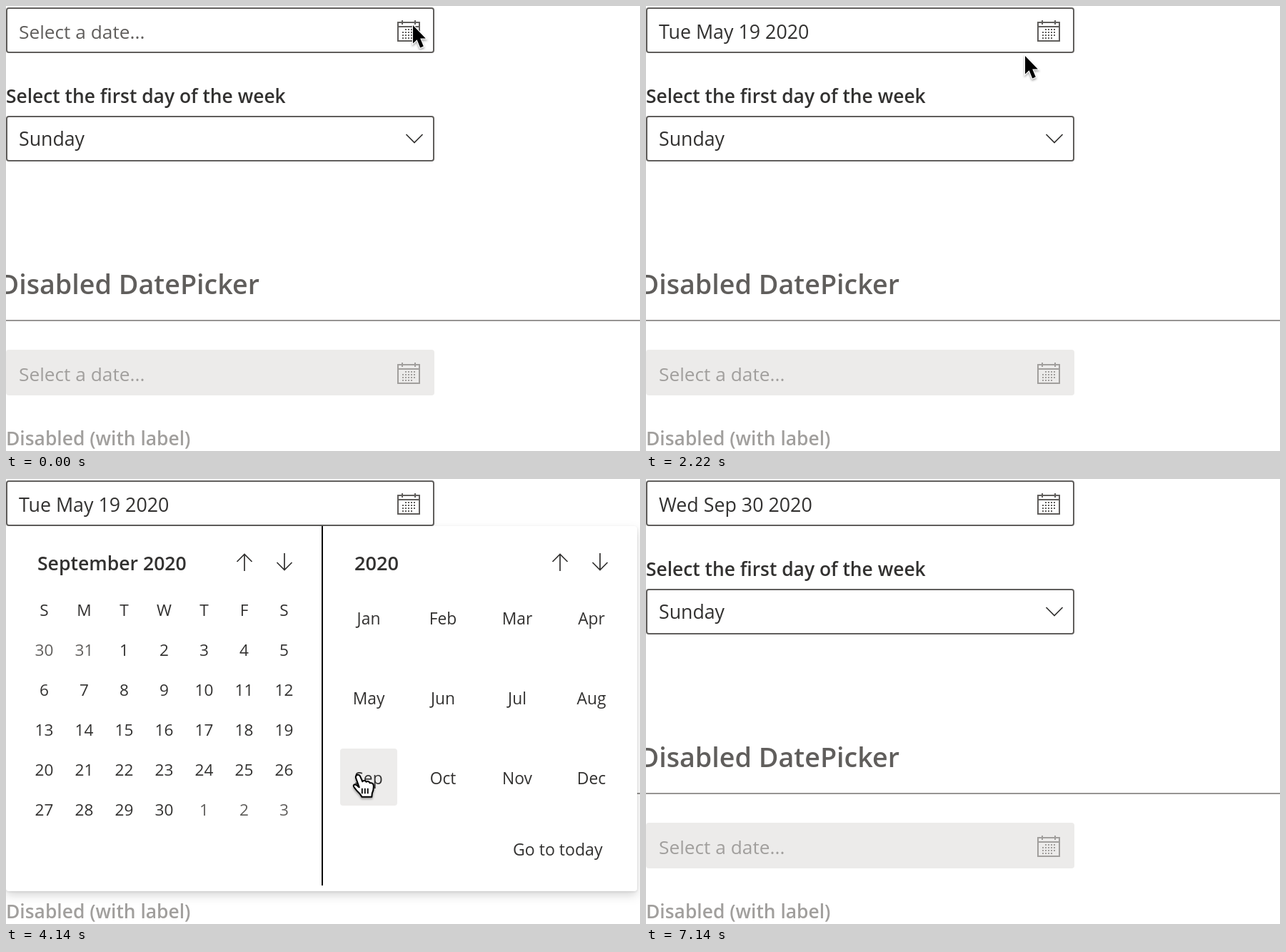
Recreate the animation shown at these times as an HTML page. Size 888 by 624 pixels, loop 7.2 s.

```html
<!DOCTYPE html>
<html lang="en">
<head>
<meta charset="utf-8">
<title>Date picker</title>
<style>
  html, body { margin: 0; width: 100%; height: 100%; overflow: hidden; background: #fff; }
  svg { display: block; width: 100%; height: 100%; }
  text { font-family: "Open Sans", "Noto Sans", sans-serif; fill: #323130; white-space: pre; }
  .semi { font-weight: 600; }
  .mid { text-anchor: middle; }
  .muted { fill: #605e5c; }
  .off { fill: #a19f9d; }
  .line { fill: none; stroke: #323130; stroke-width: 1.7; }
  .box { fill: #fff; stroke: #605e5c; stroke-width: 2; }
  .sheet { fill: #fff; filter: drop-shadow(0 6px 7px rgba(0,0,0,.14)) drop-shadow(0 1px 1.8px rgba(0,0,0,.11)); }
  .cursor { filter: drop-shadow(0 2px 1.5px rgba(0,0,0,.35)); }
</style>
</head>
<body>
<svg id="stage" viewBox="0 0 888 624"></svg>
<script>
const LOOP = 7200, STEP = 60;
const PICK_DAY = 1740, PICK_MONTH = 3360, PICK_LAST = 5940;
const OPEN = [[900, PICK_DAY], [2460, PICK_LAST]];

// Pointer stops: time, x, y
const STOPS = [
  [0, 570, 27], [960, 570, 27], [1320, 269, 337], [1560, 160, 400], [1800, 160, 402],
  [2220, 531, 70], [2340, 568, 32], [2580, 568, 32], [3240, 512, 397], [3480, 500, 415],
  [3960, 500, 415], [4500, 476, 422], [5040, 475, 422], [5700, 211, 457], [6120, 211, 457],
  [7080, 232, 645], [LOOP, 232, 645]
];

const svg = document.getElementById('stage');

function el(tag, attrs = {}, parent = svg) {
  const node = document.createElementNS('http://www.w3.org/2000/svg', tag);
  for (const key in attrs) node.setAttribute(key, attrs[key]);
  parent.appendChild(node);
  return node;
}
function text(str, x, y, size, cls = '', parent = svg) {
  const node = el('text', { x, y, 'font-size': size, class: cls }, parent);
  node.textContent = str;
  return node;
}
function rect(x, y, width, height, attrs, parent = svg) {
  return el('rect', { x, y, width, height, ...attrs }, parent);
}
const show = (node, on) => { node.style.display = on ? '' : 'none'; };

function calendarIcon(y, color) {
  const g = el('g', { transform: `translate(548 ${y})`, stroke: color, 'stroke-width': 2, fill: 'none' });
  el('path', { d: 'M1 3H31V29H1ZM1 9H31M7 0V6M25 0V6' }, g);
  for (let r = 0; r < 4; r++)
    for (let c = 0; c < 5; c++)
      if (!(r === 0 && c === 0) && !(r === 3 && c === 4))
        rect(7 + c * 4, 12 + r * 4, 2, 2, { fill: color, stroke: 'none' }, g);
}
function arrow(x, dir, parent) {
  el('path', { class: 'line', transform: `translate(${x} ${116.5 + dir / 2}) scale(1 ${dir})`,
    d: 'M0 12V-11.5M-10.5 -1L0 -11.5L10.5 -1' }, parent);
}

// Page below the callout
rect(1, 3, 598, 62, { rx: 3, class: 'box' });
const hint = text('Select a date...', 18, 46, 26.3, 'muted');
const value = text('', 18, 46, 26.8);
calendarIcon(20, '#605e5c');
text('Select the first day of the week', 0, 136, 26.4, 'semi');
rect(1, 155, 598, 62, { rx: 3, class: 'box' });
text('Sunday', 18, 196, 26.7);
el('path', { class: 'line', d: 'M560.5 180L572 191.5L583.5 180' });
text('Disabled DatePicker', 355, 404, 37.7, 'semi muted').setAttribute('text-anchor', 'end');
rect(0, 440, 888, 2, { fill: '#979593' });
rect(0, 482, 600, 64, { rx: 4, fill: '#ecebea' });
text('Select a date...', 18, 526, 26.3, 'off');
calendarIcon(500, '#a19f9d');
text('Disabled (with label)', 0, 616, 26.4, 'semi off');

// Callout
const panel = el('g');
rect(0, 66, 884, 512, { rx: 4, class: 'sheet' }, panel);
rect(442, 66, 2, 504, { fill: '#000' }, panel);
const chosen = rect(0, 378, 56, 56, { rx: 2, fill: '#e1e0df' }, panel);
const hover = rect(0, 0, 56, 56, { rx: 4, fill: '#edeceb' }, panel);
const title = text('', 44, 128, 26.6, 'semi', panel);
text('2020', 488, 128, 27.2, 'semi', panel);
[[334, 1], [390, -1], [776, 1], [832, -1]].forEach(([x, dir]) => arrow(x, dir, panel));
[...'SMTWTFS'].forEach((d, i) => text(d, 53.5 + 56 * i, 192, 22.6, 'mid', panel));
'Jan Feb Mar Apr May Jun Jul Aug Sep Oct Nov Dec'.split(' ').forEach((m, i) =>
  text(m, 508 + 104 * (i % 4), 204 + 112 * Math.floor(i / 4), 22.8, 'mid', panel));
const today = text('Go to today', 710, 528, 23.1, '', panel);

function monthGrid(lead, lastLen, len, rows, now) {
  const g = el('g', {}, panel);
  for (let i = 0; i < rows * 7; i++) {
    const n = i - lead + 1, inside = n > 0 && n <= len;
    const day = n < 1 ? n + lastLen : n > len ? n - len : n;
    const x = 53.5 + 56 * (i % 7), y = 248 + 56 * Math.floor(i / 7);
    const isNow = inside && day === now;
    if (isNow) el('circle', { cx: 278, cy: y - 10, r: 24, fill: '#0078d4' }, g);
    const label = text(day, x, y, 22.6, 'mid' + (inside ? '' : ' muted') + (isNow ? ' semi' : ''), g);
    if (isNow) label.style.fill = '#fff';
  }
  return g;
}
const may = monthGrid(5, 30, 31, 6, 21);
const sep = monthGrid(2, 31, 30, 5, 0);

// Pointers, both drawn with the hot spot at 0,0
const pointer = el('path', { class: 'cursor', fill: '#000', stroke: '#fff', 'stroke-width': 2.4,
  'paint-order': 'stroke', d: 'M0 0V25.5L5.6 20.2L10.2 31.5L14.8 29.6L10.2 18.6H17.8Z' });
const hand = el('g', { class: 'cursor', stroke: '#000', 'stroke-width': 2, 'stroke-linejoin': 'round' });
el('path', { fill: '#fff', transform: 'translate(-9 -3)',
  d: 'M5.5 6C3.5 1 9.5 -1 11.5 3.5L14.5 10.5C15.5 8.5 19 8.7 19.7 11C21.2 9.5 24.3 10.3 25 12.6' +
     'C27 11.8 29.8 13 30 16C30.3 20 30 23 28 27L27.5 32H13.5C12.5 28.5 9 26 6 22.5' +
     'C4 20 1.5 17.5 2 16C3 13.5 6 14.5 8.5 17.5L10 18.5Z' }, hand);
el('path', { d: 'M5 17V24.5M9 17V24.5M13 17V24.5', 'stroke-width': 1.8 }, hand);

function pointerAt(t) {
  const i = STOPS.findIndex((s, k) => k && t <= s[0]);
  const [t0, x0, y0] = STOPS[i - 1], [t1, x1, y1] = STOPS[i];
  const p = (t - t0) / (t1 - t0), e = p * p * (3 - 2 * p);
  return [x0 + (x1 - x0) * e, y0 + (y1 - y0) * e];
}

// Day or month cell under a point
function cellAt(x, y, rows) {
  const c = Math.floor((x - 26) / 56), r = Math.floor((y - 210) / 56);
  if (c >= 0 && c < 7 && r >= 0 && r < rows) return [26 + 56 * c, 210 + 56 * r, 56];
  const mc = Math.floor((x - 468) / 104), mr = Math.floor((y - 154) / 112);
  const mx = 468 + 104 * mc, my = 154 + 112 * mr;
  if (mc >= 0 && mc < 4 && mr >= 0 && mr < 3 && x - mx < 80 && y - my < 80) return [mx, my, 80];
  return null;
}

function slideIn(node, elapsed, from) {
  const p = Math.min(1, Math.max(0, elapsed / 367)), e = 1 - (1 - p) ** 4;
  node.setAttribute('transform', `translate(0 ${from * (1 - e)})`);
  node.setAttribute('opacity', e);
}

function draw(t) {
  const [x, y] = pointerAt(t);
  const span = OPEN.find(([a, b]) => t >= a && t < b);
  const late = t >= PICK_MONTH;

  show(hint, t < PICK_DAY);
  value.textContent = t < PICK_DAY ? '' : t < PICK_LAST ? 'Tue May 19 2020' : 'Wed Sep 30 2020';

  show(panel, span);
  let cell = null;
  if (span) {
    slideIn(panel, t - span[0] + STEP, -20);
    title.textContent = late ? 'September 2020' : 'May 2020';
    today.style.fill = late ? '#323130' : '#c8c6c4';
    show(may, !late);
    show(sep, late);
    slideIn(sep, t - PICK_MONTH + STEP, 40);
    show(chosen, !late);
    chosen.setAttribute('x', t < PICK_DAY ? 250 : 138);
    cell = cellAt(x, y, late ? 5 : 6);
    const onChosen = cell && !late && cell[1] === 378 && cell[0] === +chosen.getAttribute('x');
    show(hover, cell && !onChosen);
    if (cell) ['x', 'y', 'width', 'height'].forEach((k, i) => hover.setAttribute(k, cell[Math.min(i, 2)]));
  }

  const active = cell ? hand : pointer;
  show(hand, cell);
  show(pointer, !cell);
  active.setAttribute('transform', `translate(${x} ${y})`);
}

const start = performance.now();
function tick() {
  const t = (performance.now() - start) % LOOP;
  draw(Math.floor(t / STEP) * STEP);
  requestAnimationFrame(tick);
}
tick();
</script>
</body>
</html>
```
